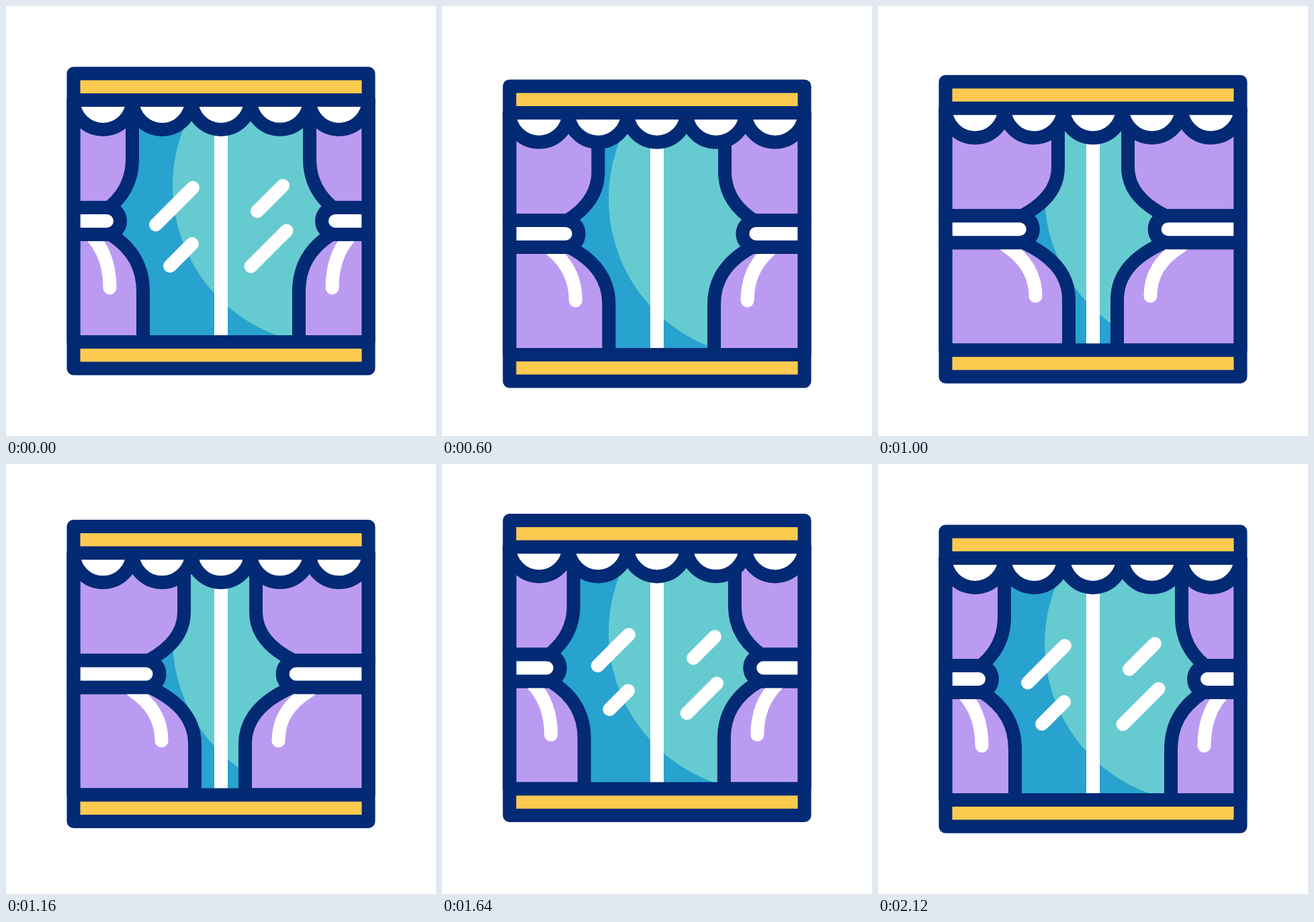
An HTML page for the animation above (2440 ms loop, 640 px wide and 640 px high).

```html
<!DOCTYPE html>
<html lang="en">
<head>
<meta charset="utf-8">
<title>Window with curtains</title>
<style>
  html, body { margin: 0; width: 100%; height: 100%; overflow: hidden; background: #fff; }
  svg { display: block; width: 100vw; height: 100vh; }
  .line { fill: none; stroke: #032a74; stroke-width: 20; stroke-linecap: round; stroke-linejoin: round; }
  .cloth { fill: #bb9bf2; }
  .white { fill: #fff; }
  .shine { fill: none; stroke: #fff; stroke-width: 20; stroke-linecap: round; }
  .trim { fill: #fdca50; }
</style>
</head>
<body>
<svg viewBox="0 0 640 640">
  <defs>
    <clipPath id="pane"><rect x="105" y="140" width="430" height="360"/></clipPath>
  </defs>
  <g id="window">
    <g clip-path="url(#pane)">
      <rect x="100" y="140" width="440" height="360" fill="#28a2cf"/>
      <circle cx="484.5" cy="268" r="236.5" fill="#66cbd0"/>
      <rect class="white" x="310" y="140" width="20" height="360"/>
    </g>
    <g id="glints"></g>
    <g id="left"></g>
    <g id="right" transform="translate(640 0) scale(-1 1)"></g>
    <path id="valance" class="line white" style="fill:#fff"/>
    <rect class="trim" x="105" y="105" width="430" height="30"/>
    <rect class="trim" x="105" y="505" width="430" height="30"/>
    <path class="line" d="M100.5 100.5H539.5V539.5H100.5ZM100.5 140H539.5M100.5 500H539.5"/>
  </g>
</svg>
<script>
const LOOP = 2440, STEP = 40, SWAY = 25.5, TRAVEL = 80;
const SVG = "http://www.w3.org/2000/svg";
const byId = id => document.getElementById(id);

function addPath(parent, className) {
  const path = document.createElementNS(SVG, "path");
  path.setAttribute("class", className);
  return parent.appendChild(path);
}

// Smooth 0..1 ramp between two times
function ramp(t, start, end) {
  const p = Math.min(1, Math.max(0, (t - start) / (end - start)));
  return p * p * (3 - 2 * p);
}

byId("valance").setAttribute("d", "M100.5 140" + "a43.9 43.9 0 0 0 87.8 0".repeat(5));

// Anchor x, y and the signed length along the diagonal
const glints = [
  [278, 270.5, -55], [277, 354, -33], [374, 305.5, 38], [364.5, 387.5, 53]
].map(([x, y, reach]) => ({ x, y, reach, path: addPath(byId("glints"), "shine") }));

function makeCurtain(id, tieRatio) {
  const group = byId(id);
  const upper = addPath(group, "line");
  const lower = addPath(group, "line");
  const shine = addPath(group, "shine");
  const tie = addPath(group, "line");
  upper.style.fill = lower.style.fill = "#bb9bf2";
  tie.style.fill = "#fff";

  return shift => {
    const slide = shift * tieRatio, bend = shift * 0.92;
    upper.setAttribute("d", `M100.5 140H${188 + shift}V228
      C${188 + shift} 257 ${176.5 + bend} 281 ${153.5 + slide} 300H100.5Z`);
    lower.setAttribute("d", `M100.5 500H${204 + shift}V425
      C${204 + shift} 390 ${190 + bend} 362 ${156 + slide} 340H100.5Z`);
    shine.setAttribute("d", `M${154.5 + shift} 419.5
      C${154.5 + shift} 388 ${146 + bend} 364 ${130 + slide} 345`);
    tie.setAttribute("d", `M100.5 300H${150 + slide}a20 20 0 0 1 0 40H100.5Z`);
  };
}

const setLeft = makeCurtain("left", 0.76);
const setRight = makeCurtain("right", 0.73);

function draw(t) {
  const y = SWAY * (ramp(t, 200, 800) - 2 * ramp(t, 800, 1400) + ramp(t, 1400, 2000));
  byId("window").setAttribute("transform", `translate(0 ${y})`);

  setLeft(TRAVEL * (ramp(t, 262, 892) - ramp(t, 1080, 1773)));
  setRight(TRAVEL * (ramp(t, 364, 920) - ramp(t, 1234, 1805)));

  const visible = 1 - ramp(t, 200, 485) + ramp(t, 1390, 1725);
  for (const { x, y, reach, path } of glints) {
    const d = reach * visible;
    path.setAttribute("d", `M${x} ${y}l${d} ${-d}`);
    path.style.display = visible > 0.001 ? "" : "none";
  }
}

const begin = performance.now();
function tick() {
  const t = (performance.now() - begin) % LOOP;
  draw(Math.floor(t / STEP) * STEP);
  requestAnimationFrame(tick);
}
tick();
</script>
</body>
</html>
```
